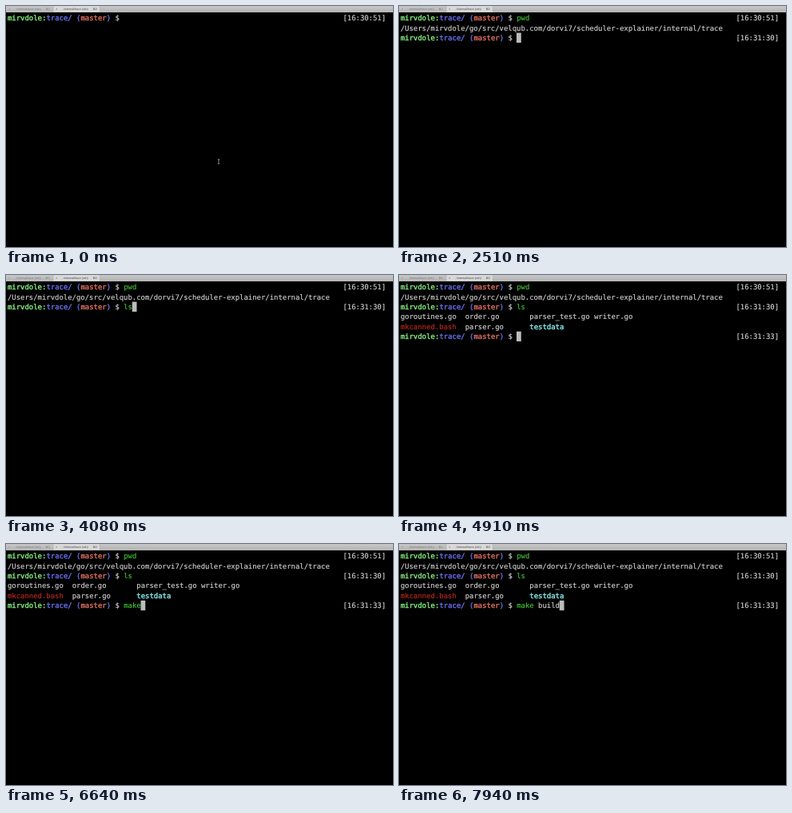
These frames come from a looping animation (484 by 302 pixels, 7.99 s). An HTML page:

```html
<!DOCTYPE html>
<html lang="en">
<head>
<meta charset="utf-8">
<title>Terminal session</title>
<style>
html, body { margin: 0; width: 100%; height: 100%; overflow: hidden; background: #000; }
svg { display: block; width: 100vw; height: 100vh; }
text { white-space: pre; text-rendering: geometricPrecision; }
.term text { font: 8.93px "DejaVu Sans Mono", "Liberation Mono", monospace; stroke-width: .12; }
.term .strong { stroke-width: .36; }
.tabs text { font: 3.6px "Liberation Sans", "DejaVu Sans", sans-serif; }
</style>
</head>
<body>
<svg id="stage" viewBox="0 0 484 302">
  <defs>
    <linearGradient id="bar" x2="0" y2="1">
      <stop offset="0" stop-color="#c6c6c6"/>
      <stop offset="1" stop-color="#b4b4b4"/>
    </linearGradient>
  </defs>
  <rect width="484" height="302"/>
  <g class="tabs" id="tabs">
    <rect width="484" height="8" fill="url(#bar)"/>
    <rect x="59" width="58.5" height="7.5" fill="#d8d8d8"/>
    <path d="M59 0V8M117.5 0V8" stroke="#a2a2a2" stroke-width=".5"/>
  </g>
  <g class="term" id="term"></g>
  <path id="pointer" d="M264.8 192.3H267.2M266 192.3V197.7M264.8 197.7H267.2" fill="none" stroke="#aaa" stroke-width=".8"/>
</svg>
<script>
const LOOP = 7990, BLINK = 580, HOLD = 500;
const COL = 5.377, ROW = 12.4, LEFT = 2, BASE = 18.2;
const PROMPT_COLS = 27, CLOCK_COL = 78;
const WHITE = '#d6d6d6', GREEN = '#43c936', RED = '#c12a20', BLUE = '#6a70f0';
const LIME = '#86f080', CORAL = '#e0705f', CYAN = '#8af0f0';
const term = document.getElementById('term');
const tabs = document.getElementById('tabs');
const pointer = document.getElementById('pointer');

function add(parent, tag, attrs, text) {
  const node = document.createElementNS('http://www.w3.org/2000/svg', tag);
  for (const name in attrs) node.setAttribute(name, attrs[name]);
  if (text) node.textContent = text;
  parent.appendChild(node);
  return node;
}
const colX = col => LEFT + col * COL;
const show = (node, on) => node.setAttribute('visibility', on ? 'visible' : 'hidden');

function paint(node, color) {
  node.setAttribute('fill', color);
  node.setAttribute('stroke', color);
}
function put(parent, col, row, text, color = WHITE, look = '') {
  const node = add(parent, 'text', { x: colX(col), y: BASE + row * ROW, class: look }, text);
  paint(node, color);
  return node;
}

// Each command: its row, start time, text and the time of every key.
const commands = [
  { row: 0, at: 0, clock: '[16:30:51]', text: 'pwd', keys: [1000, 1110, 1220] },
  { row: 2, at: 1600, clock: '[16:31:30]', text: 'ls', keys: [3600, 3750] },
  { row: 5, at: 4500, clock: '[16:31:33]', text: 'make build',
    keys: [5900, 6020, 6150, 6280, 6850, 7000, 7130, 7260, 7400, 7560] }
];

function addPrompt(cmd) {
  const g = cmd.group = add(term, 'g', {});
  put(g, 0, cmd.row, 'mirvdole:', LIME, 'strong');
  put(g, 9, cmd.row, 'trace/ (', BLUE, 'strong');
  put(g, 17, cmd.row, 'master', CORAL, 'strong');
  put(g, 23, cmd.row, ')', BLUE, 'strong');
  put(g, 25, cmd.row, '$');
  put(g, CLOCK_COL, cmd.row, cmd.clock);
  cmd.name = cmd.text.split(' ')[0];
  cmd.word = put(g, PROMPT_COLS, cmd.row, '');
  cmd.rest = put(g, PROMPT_COLS + cmd.name.length, cmd.row, '');
}

const cursor = add(term, 'rect', { width: COL + .4, height: ROW, fill: '#bcbcbc' });
commands.forEach(addPrompt);

const path = add(term, 'g', {});
put(path, 0, 1, '/Users/mirvdole/go/src/velqub.com/dorvi7/scheduler-explainer/internal/trace');

const listing = add(term, 'g', {});
put(listing, 0, 3, 'goroutines.go');
put(listing, 15, 3, 'order.go');
put(listing, 30, 3, 'parser_test.go');
put(listing, 45, 3, 'writer.go');
put(listing, 0, 4, 'mkcanned.bash', RED);
put(listing, 15, 4, 'parser.go');
put(listing, 30, 4, 'testdata', CYAN, 'strong');

['#777', '#444'].forEach((fill, i) => {
  const x = i * 59;
  add(tabs, 'text', { x: x + 3.2, y: 5.3, fill }, '×');
  add(tabs, 'text', { x: x + 11, y: 5.3, fill }, '../internal/trace (zsh)');
  add(tabs, 'text', { x: x + 49.5, y: 5.3, fill }, '⌘' + (i + 1));
});

// A command name is red until it is complete.
function typeCommand(cmd, t) {
  const size = cmd.name.length;
  const count = cmd.keys.filter(k => k <= t).length;
  cmd.word.textContent = cmd.name.slice(0, count);
  paint(cmd.word, count < size ? RED : GREEN);
  cmd.rest.textContent = cmd.text.slice(size, Math.max(size, count));
  show(cmd.group, t >= cmd.at);
  return count;
}

function placeCursor(cmd, count, t) {
  cursor.setAttribute('x', colX(PROMPT_COLS + count) - .2);
  cursor.setAttribute('y', 8.8 + cmd.row * ROW);
  const last = count ? cmd.keys[count - 1] : cmd.at;
  const blinkOn = t >= 50 && Math.floor((t - 50) / BLINK) % 2 === 0;
  show(cursor, blinkOn || (last > 0 && t - last < HOLD));
}

function render(t) {
  const active = commands.filter(c => c.at <= t).pop();
  for (const cmd of commands) {
    const count = typeCommand(cmd, t);
    if (cmd === active) placeCursor(cmd, count, t);
  }
  show(path, t >= commands[1].at);
  show(listing, t >= commands[2].at);
  show(pointer, t < 680);
}

const start = performance.now();
function tick() {
  render((performance.now() - start) % LOOP);
  requestAnimationFrame(tick);
}
tick();
</script>
</body>
</html>
```
